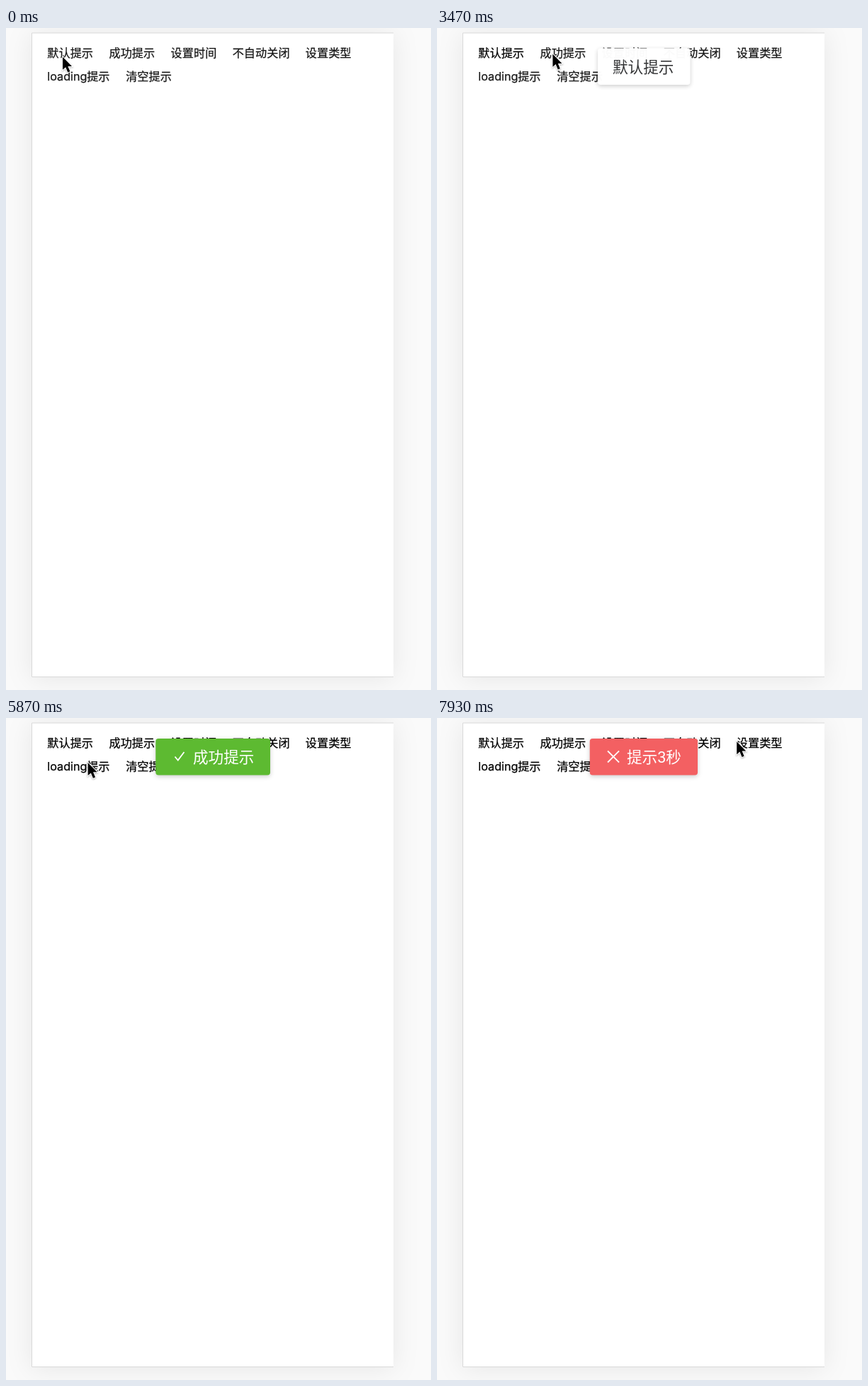
Animation, 600 px wide and 933 px high, one loop 8000 ms. Source, as an HTML page:

```html
<!DOCTYPE html>
<html lang="zh">
<head>
<meta charset="utf-8">
<title>Toast demo</title>
<style>
  html, body { margin: 0; width: 100%; height: 100%; overflow: hidden; background: #fafafa; }
  svg { display: block; width: 100%; height: 100%; }
  text { font-family: Inter, "Noto Sans CJK SC", "Noto Sans CJK", sans-serif; font-size: 16.2px; }
  #links text { stroke: currentColor; fill: currentColor; stroke-width: .25; }
  .panel { filter: drop-shadow(0 2px 18px rgba(0, 0, 0, .08)); }
  .toast rect { filter: drop-shadow(0 2px 3px rgba(0, 0, 0, .2)); }
  .toast text { font-family: Roboto, "Noto Sans CJK SC", "Noto Sans CJK", sans-serif; font-size: 21.6px; }
  .toast path { fill: none; stroke: #fff; stroke-width: 1.8; }
  #cursor { filter: drop-shadow(0 1.5px 1px rgba(0, 0, 0, .3)); }
</style>
</head>
<body>
<svg viewBox="0 0 600 933">
  <rect class="panel" x="36" y="7" width="511" height="908" fill="#fff"/>
  <path d="M547 7H36.5V914.5H547" fill="none" stroke="#d9d9d9"/>
  <g id="links"></g>
  <g class="toast">
    <rect x="227" y="29" width="130.5" height="51.5" rx="4" fill="#fff"/>
    <text x="248" y="63" fill="#303133">默认提示</text>
  </g>
  <g class="toast">
    <rect x="211.3" y="29" width="161.7" height="51.5" rx="4" fill="#5dba31"/>
    <path d="M238.5 54.5l4.3 5 8.7-11.5"/>
    <text x="264" y="63" fill="#fff">成功提示</text>
  </g>
  <g class="toast">
    <rect x="215.7" y="29" width="152.3" height="51.5" rx="4" fill="#f36062"/>
    <path d="M241 46.5l16 16m0-16l-16 16"/>
    <text x="268" y="63" fill="#fff">提示3秒</text>
  </g>
  <path id="cursor" d="M0 0V18L4.2 14.4L7.3 21.8L10.4 20.5L7.4 13.3H13Z"
        stroke="#fff" stroke-width="2" paint-order="stroke"/>
</svg>
<script>
const LOOP = 8000, FADE = 300, RISE = 21.6;

const LINKS = [
  ['默认提示', 58.3, 41.1], ['成功提示', 145.5, 41.1], ['设置时间', 232.6, 41.1],
  ['不自动关闭', 319.7, 41.1], ['设置类型', 422.8, 41.1],
  ['loading', 58.3, 73.6], ['提示', 114.2, 73.6], ['清空提示', 169.2, 73.6]
];

// Enter and leave start times of each toast
const TOASTS = [[1460, 3465], [4010, 6020], [7260, 9260]];

// Pointer moves: start, end, target x, y and an optional bend point
const START = [80, 40.8];
const MOVES = [
  [40, 330, 78, 37],
  [900, 1200, 77.5, 32.5],
  [1650, 2070, 98.6, 57.5],
  [2270, 3070, 163.4, 36.7],
  [4600, 5330, 115, 63],
  [5840, 6400, 188.5, 62.6],
  [6640, 7070, 258, 36.5],
  [7300, 7930, 423.2, 33.2, 330, 141]
];

const clamp = v => Math.min(1, Math.max(0, v));
const smooth = v => v * v * (3 - 2 * v);

const links = LINKS.map(([label, x, y]) => {
  const el = document.createElementNS('http://www.w3.org/2000/svg', 'text');
  el.setAttribute('x', x);
  el.setAttribute('y', y);
  el.textContent = label;
  document.getElementById('links').append(el);
  return el;
});
const toasts = document.querySelectorAll('.toast');
const cursor = document.getElementById('cursor');

function pointerAt(t) {
  let [x, y] = START;
  for (const [from, to, tx, ty, bx = (x + tx) / 2, by = (y + ty) / 2] of MOVES) {
    if (t < from) break;
    const p = smooth(clamp((t - from) / (to - from))), q = 1 - p;
    const bend = (a, b, c) => q * q * a + 2 * q * p * b + p * p * c;
    [x, y] = [bend(x, bx, tx), bend(y, by, ty)];
  }
  return [x, y];
}

function draw(t) {
  links.forEach((el, i) => el.setAttribute('color', t >= (i ? 4000 : 1470) ? '#000' : '#181818'));
  TOASTS.forEach(([enter, leave], i) => {
    const shown = clamp((t - enter) / FADE) - clamp((t - leave) / FADE);
    toasts[i].setAttribute('opacity', shown);
    toasts[i].setAttribute('transform', `translate(0 ${(shown - 1) * RISE})`);
  });
  cursor.setAttribute('transform', `translate(${pointerAt(t)})`);
}

const origin = performance.now();
function frame() {
  draw((performance.now() - origin) % LOOP);
  requestAnimationFrame(frame);
}
frame();
</script>
</body>
</html>
```
